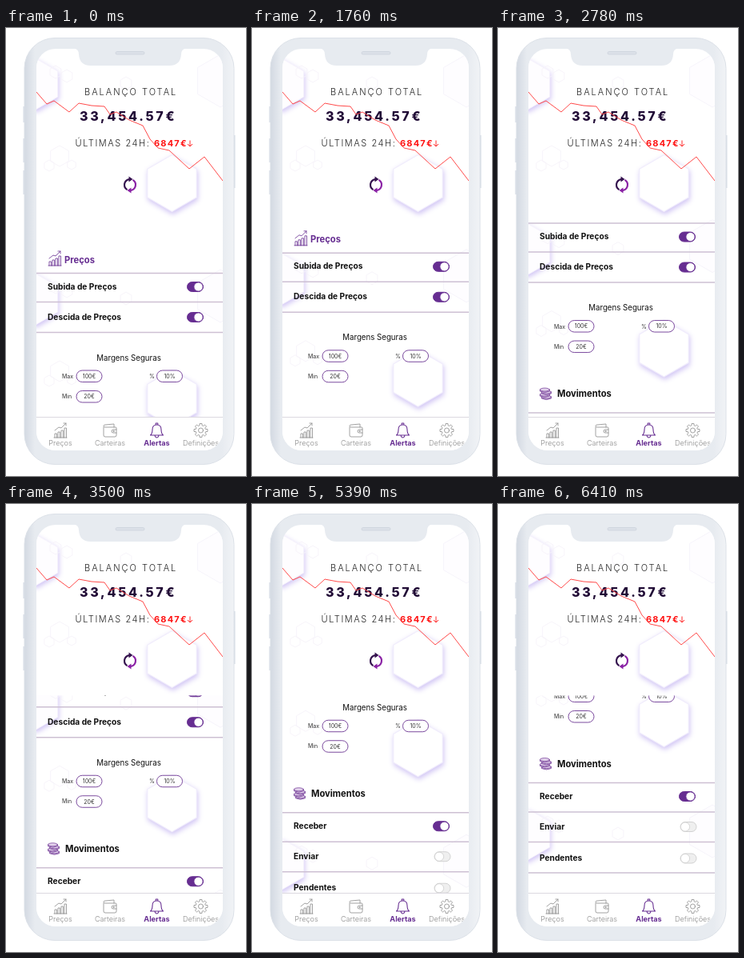
These frames come from a looping animation (300 px wide and 560 px high, 8000 ms). An HTML page:

```html
<!DOCTYPE html>
<html lang="pt">
<head>
<meta charset="utf-8">
<style>
  html, body { margin: 0; width: 100%; height: 100%; overflow: hidden; background: #fff; }
  svg { display: block; width: 300px; height: 560px; font-family: Inter, "Open Sans", sans-serif; }
  .icon { fill: none; stroke-width: .8; stroke-linecap: round; stroke-linejoin: round; }
  .glow { filter: drop-shadow(1px 3px 3px #d0c4f4); }
</style>
</head>
<body>
<svg id="stage" viewBox="0 0 300 560"></svg>
<script>
const PURPLE = '#662d91', GREY = '#8b8b8b', INK = '#111', BODY = '#e7ebf0';
const LOOP = 8000, START = 1100, STEP = 30, STEPS = 178, DISTANCE = 195;
const TILE = 269;

const text = (x, y, str, size, weight = 400, fill = INK, extra = '') =>
  `<text x="${x}" y="${y}" font-size="${size}" font-weight="${weight}" fill="${fill}" ${extra}>${str}</text>`;
const middle = 'text-anchor="middle"';
const icon = (x, y, color, body) =>
  `<g class="icon" transform="translate(${x} ${y})" stroke="${color}">${body}</g>`;
const rule = (y, color = '#cdc0d3', width = 1.6) =>
  `<path d="M38 ${y}H271" stroke="${color}" stroke-width="${width}"/>`;

function hex(x, y, r, attrs) {
  const pts = [...Array(6).keys()].map(i => {
    const a = Math.PI * (i / 3 + 1 / 6);
    return `${(x + r * Math.cos(a)).toFixed(1)},${(y + r * Math.sin(a)).toFixed(1)}`;
  });
  return `<polygon points="${pts.join(' ')}" stroke-linejoin="round" ${attrs}/>`;
}

// Honeycomb backdrop, repeated down the page
function backdrop(dy) {
  const faint = 'fill="none" stroke="#f6f3fa" stroke-width=".9"';
  const small = [[67, 160, 13], [54, 172, 7], [82, 171, 6], [62, 55, 8], [76, 60, 8], [150, 69, 8]];
  return `<g transform="translate(0 ${dy})">` +
    hex(268, 66, 33, 'fill="#fefdff" stroke="#f6f4fb"') +
    hex(37, 70, 32, 'class="glow" fill="#fefdff" stroke="#f6f3fc"') +
    small.map(([x, y, r]) => hex(x, y, r, faint)).join('') +
    hex(207.5, 194, 35.5, 'class="glow" fill="#fff" stroke="#f1edfc" stroke-width="1.2"') + '</g>';
}

const chart = `<path d="M-8 9H8M-7 9V4h2.500V9M-3 9V2h2.500V9M1 9V0h2.500V9M5 9V-3h2.500V9M-7 0L-2-4L1-3L7-9M4-9H7V-6"/>`;
const wallet = `<path d="M-8-4V6q0 2 2 2H6q2 0 2-2V-3q0-1-1-1H-6q-2 0-2-1.500T-6-7L5-8V-4M8-1H4q-2 0-2 2t2 2H8"/>
  <circle cx="4.500" cy="1" r=".6"/>`;
const bell = `<path stroke-width="1.100" d="M-8 6Q-5.500 4-5.500-1Q-5.500-7 0-7Q5.500-7 5.500-1Q5.500 4 8 6ZM-2.500 6Q-2 9 0 9T2.500 6M-1.300-7V-9H1.300V-7"/>`;
const coins = [[1, 4], [-1, 1], [1, -2], [-1, -5]].map(([x, y]) =>
  `<path d="M${x - 6} ${y}v2q6 3 12 0v-2" fill="#c9add8"/><ellipse cx="${x}" cy="${y}" rx="6" ry="2" fill="#e3d2ec"/>`).join('');

function gear() {
  const pts = [];
  for (let i = 0; i < 8; i++)
    for (const [r, a] of [[6.3, -.27], [8.6, -.17], [8.6, .17], [6.3, .27]]) {
      const t = i * Math.PI / 4 + a;
      pts.push(`${(r * Math.cos(t)).toFixed(2)},${(r * Math.sin(t)).toFixed(2)}`);
    }
  return `<polygon points="${pts.join(' ')}"/><circle r="3"/>`;
}

function toggle(y, on) {
  const x = on ? 226 : 227.5, color = on ? PURPLE : '#d2d2d2';
  return `<rect x="${x + .5}" y="${y - 6}" width="20" height="12" rx="6" fill="${on ? PURPLE : '#efefef'}" stroke="${color}"/>
    <circle cx="${x + (on ? 14.5 : 6.5)}" cy="${y}" r="5.600" fill="#fff" stroke="${color}" stroke-width=".9"/>`;
}

const row = (y, label, on) => text(52, y + 3.5, label, 10.2, 700) + toggle(y + .5, on);

const pill = (x, y, label) =>
  `<rect x="${x}" y="${y - 7.5}" width="32" height="14.500" rx="7.250" fill="#fff" stroke="#7b4a9e"/>` +
  text(x + 16, y + 2.3, label, 7, 400, '#333', middle);

const content = [1, 2].map(i => backdrop(i * TILE)).join('') +
  icon(61, 288, PURPLE, chart) + text(73, 293.5, 'Preços', 11.2, 700, PURPLE) +
  [306.5, 342.5, 380.5, 543.5, 580, 617.5, 656].map(y => rule(y)).join('') +
  row(323, 'Subida de Preços', true) + row(361, 'Descida de Preços', true) +
  text(153.5, 415.5, 'Margens Seguras', 9.7, 400, INK, middle) +
  text(70, 438, 'Max', 7, 400, '#333') + pill(88, 435.5, '100€') +
  text(179, 438, '%', 7, 400, '#333') + pill(188.5, 435.5, '10%') +
  text(70, 463, 'Min', 7, 400, '#333') + pill(88, 461, '20€') +
  icon(59.5, 519.5, '#7b4a9e', coins) + text(74, 523.8, 'Movimentos', 11.2, 700) +
  row(560, 'Receber', true) + row(598, 'Enviar', false) + row(637.5, 'Pendentes', false);

const halfTurn = color => `<path d="M-4.200 5.600A7 7 0 0 1-1-6.900" fill="none" stroke="${color}" stroke-width="2.200"/>
  <path d="M-1.500-10.500L3.500-7L-1.500-3.500Z" fill="${color}" stroke="none"/>`;
const refresh = halfTurn('#35134f') + `<g transform="rotate(180)">${halfTurn('#8a22a5')}</g>`;

const header = backdrop(0) +
  text(98, 83.5, 'BALANÇO TOTAL', 11, 300, '#222', 'letter-spacing="2"') +
  text(92, 116, '33,454.57€', 16, 800, '#210b36', 'letter-spacing="2.7"') +
  text(86.5, 148, 'ÚLTIMAS 24H:', 11, 300, '#222', 'letter-spacing="1.55"') +
  text(185, 148, '6847€', 11, 700, '#f11', 'letter-spacing="1.2"') +
  `<path d="M230 140.500V148M227 145L230 148L233 145" fill="none" stroke="#f11" stroke-width=".9"/>
  <polyline points="38,80 51,95 60,91 79,105 91,94 107,97 123,98 130,108 138,105 154,115 171,122 180,139 190,150 204,153 229,176 248,161 271,191"
    fill="none" stroke="#ff4a4a" stroke-width="1"/>` +
  icon(155, 196, PURPLE, refresh);

const tabs = [[68, 'Preços', chart], [130, 'Carteiras', wallet], [188.5, 'Alertas', bell], [243.5, 'Definições', gear()]];
const nav = `<path d="M38 486H271V530H38Z" fill="#fff"/>` + rule(486.5, '#dcd9e0', 1) +
  tabs.map(([x, label, art], i) => {
    const active = i === 2, color = active ? PURPLE : GREY;
    return icon(x, 503, color, art) +
      text(x, 522, label, 9.1, active ? 700 : 300, color, middle);
  }).join('');

const stage = document.getElementById('stage');
stage.innerHTML = `
  <defs>
    <clipPath id="screen"><rect x="38" y="26" width="233" height="502" rx="24"/></clipPath>
    <clipPath id="list"><path d="M38 239.500H271V486H38Z"/></clipPath>
    <linearGradient id="body">
      <stop stop-color="#d3d9e2"/><stop offset=".05" stop-color="${BODY}"/>
      <stop offset=".94" stop-color="${BODY}"/><stop offset="1" stop-color="#f1f3f6"/>
    </linearGradient>
  </defs>
  <path d="M22.500 98V118M22.500 138V168M22.500 178V208M285.500 134V200" stroke="#d6dce5" stroke-width="2"/>
  <rect x="23" y="12.500" width="262" height="533" rx="38" fill="url(#body)" stroke="#dce1e8"/>
  <g clip-path="url(#screen)">
    <rect x="38" y="26" width="233" height="502" fill="#fff"/>
    ${header}
    <g clip-path="url(#list)"><path d="M38 239H271V486H38Z" fill="#fff"/><g id="scroll">${content}</g></g>
    ${nav}
  </g>
  <path d="M84 25Q91 26 91 33Q92 47 106 47H204Q218 47 219 33Q219 26 226 25Z" fill="${BODY}"/>
  <rect x="137" y="29.500" width="36" height="3.500" rx="1.750" fill="#dce1e8" stroke="#c9d0da" stroke-width=".7"/>`;

const list = document.getElementById('scroll');
function draw() {
  const t = performance.now() % LOOP;
  const n = Math.max(0, Math.min(STEPS, Math.floor((t - START) / STEP) + 1));
  list.setAttribute('transform', `translate(0 ${-n * DISTANCE / STEPS})`);
  requestAnimationFrame(draw);
}
draw();
</script>
</body>
</html>
```
